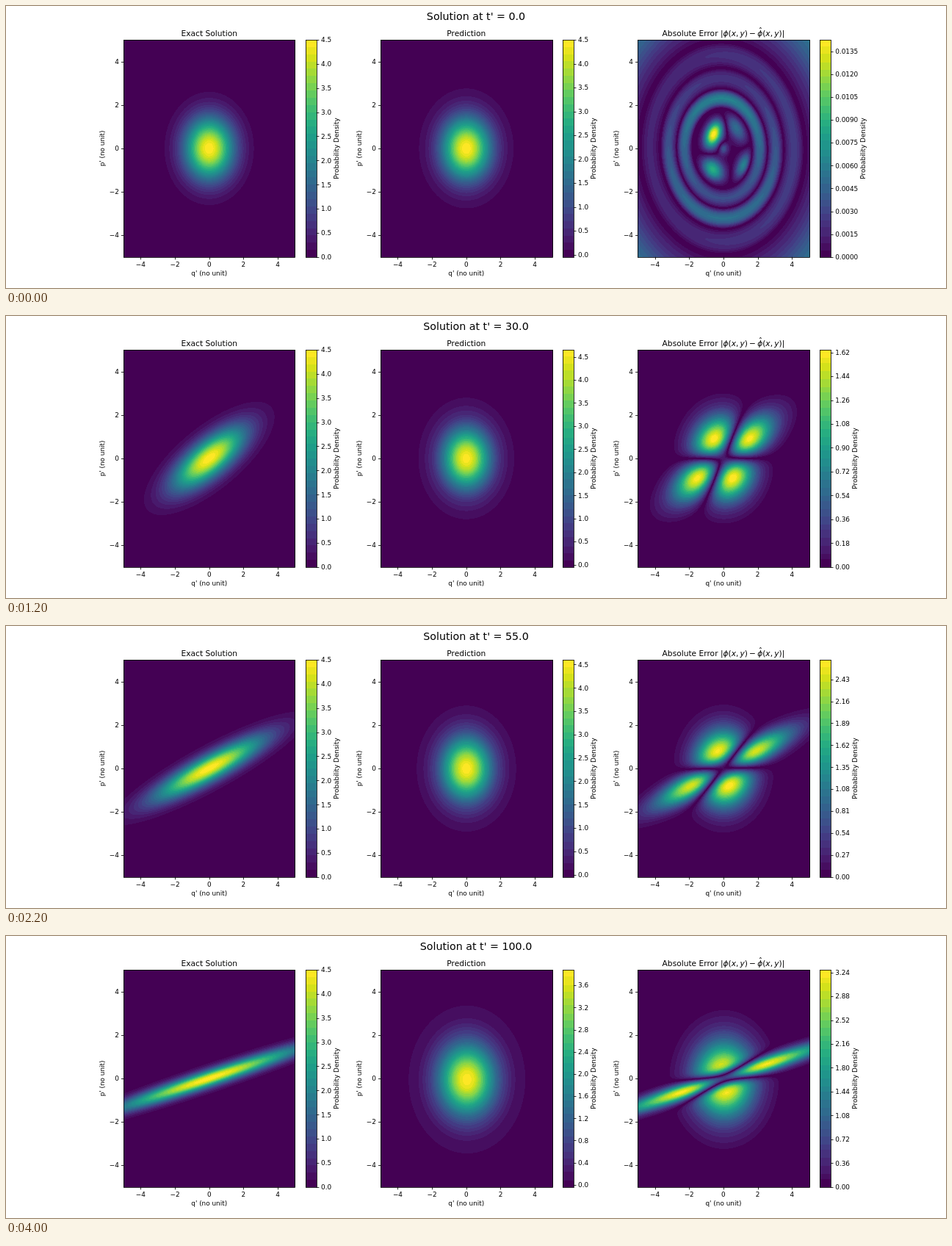
An HTML page with a canvas that plays this animation: 1280 px wide and 384 px high, repeating every 4200 ms.

```html
<!DOCTYPE html>
<html>
<head>
<meta charset="utf-8">
<style>
html, body { margin: 0; width: 100%; height: 100%; overflow: hidden; background: #fff; }
canvas { display: block; }
</style>
</head>
<body>
<canvas id="stage" width="1280" height="384"></canvas>
<script>
const ctx = document.getElementById('stage').getContext('2d');
const FRAME_MS = 200, FRAMES = 21, DT = 5;
const W = 233.4, TOP = 46.08, BOTTOM = 341.76, H = BOTTOM - TOP;
const PANELS = [160, 510.1, 860.2], BAR_GAP = 248, BAR_W = 14.78;
const SMALL = 8.89, TITLE = 10.67, HEAD = 14.22, TICK = 3.1, PAD = 6.2;
const SHADES = 30;

const viridis = ('440154 48186a 472d7b 424086 3b528b 33638d 2c728e 26828e 21918c ' +
  '1fa088 28ae80 3fbc73 5ec962 84d44b addc30 d8e219 fde725').split(' ')
  .map(h => [0, 2, 4].map(i => parseInt(h.substr(i, 2), 16)));
const shades = Array.from({ length: SHADES }, (_, k) => {
  const u = k / (SHADES - 1) * 16, i = Math.min(15, Math.floor(u));
  return viridis[i].map((c, j) => Math.round(c + (viridis[i + 1][j] - c) * (u - i)));
});

// time, prediction peak, prediction falloff, error peak
const KEYS = [
  [0, 4.49, .5, .0142], [5, 4.51, .508, .305], [10, 4.53, .516, .61], [15, 4.55, .524, .91],
  [20, 4.57, .532, 1.18], [35, 4.63, .515, 1.87], [50, 4.6, .495, 2.49], [55, 4.58, .488, 2.66],
  [70, 4.43, .457, 3.02], [85, 4.18, .424, 3.15], [100, 3.86, .381, 3.27]
];

function keyed(t) {
  const i = Math.max(1, KEYS.findIndex(k => k[0] >= t));
  const a = KEYS[i - 1], b = KEYS[i], f = (t - a[0]) / (b[0] - a[0]);
  return a.map((v, j) => v + (b[j] - v) * f);
}

// Contour levels with a round step, at most 101 intervals
function scale(max, negative) {
  const raw = max / 101, mag = 10 ** Math.floor(Math.log10(raw));
  const step = mag * [1, 1.5, 2, 2.5, 3, 4, 5, 6, 8, 10].find(m => m * mag >= raw - 1e-9);
  const up = Math.ceil(max / step - 1e-9), low = negative ? -1 : 0, count = up - low;
  const every = Math.ceil((count + 1) / 10);
  const shade = v => {
    const i = Math.max(0, Math.min(count - 1, Math.floor(v / step - low)));
    return Math.floor((i + .5) / count * SHADES);
  };
  return { min: low * step, max: up * step, up, every, step, shade };
}

// Gaussian spot, its long axis turned by the given angle
function spot(q, p, x, y, long, short, angle) {
  const c = Math.cos(angle), s = Math.sin(angle), dx = q - x, dy = p - y;
  return Math.exp(-(((dx * c + dy * s) / long) ** 2 + ((dy * c - dx * s) / short) ** 2) / 2);
}

// Small ripples left over at the start: four spots inside, rings outside
function residual(q, p) {
  const a = Math.atan2(p, q), up = Math.sin(a);
  const r = Math.hypot(q, p) + .08 * Math.cos(a) + .06 * Math.sin(2 * a + 1);
  if (r < 1.8) {
    return (1 - (r / 1.8) ** 6) * (
      .0145 * spot(q, p, -.57, .66, .48, .32, 1) - .0095 * spot(q, p, -.65, -1, .5, .36, -.5)
      + .0095 * spot(q, p, 1.3, -.8, .55, .3, 1) - .006 * spot(q, p, .8, 1, .6, .35, -.8)
      - .004 * spot(q, p, 0, 0, .2, .2, 0));
  }
  if (r < 2.7) return .0048 * (1 + .3 * up) * Math.sin(Math.PI * (r - 1.8) / .9);
  if (r < 3.65) return .0038 * (1 - .4 * up) * Math.sin(Math.PI * (r - 2.7) / .95);
  if (r < 4.85) return (.0021 + .0006 * Math.cos(a)) * Math.sin(Math.PI * (r - 3.65) / 1.2);
  return .0024 * (r - 4.85);
}

function model(t) {
  const [, peak, fall, errPeak] = keyed(t);
  const s = .0355 * t, tail = .004 * Math.min(1, t / 20), drift = (t / 100) ** 3;
  const exact = (q, p) => 4.49 * Math.exp(-((q - s * p) ** 2 + p * p) / 2);
  const guess = (q, p) => {
    const r2 = (q - .04 * drift) ** 2 + (p + .05 * drift) ** 2;
    return peak * Math.exp(-fall * r2 + tail * r2 * r2);
  };
  const error = (q, p) => Math.abs(t ? exact(q, p) - guess(q, p) : residual(q, p));
  return [
    { f: exact, sc: scale(4.49) },
    { f: guess, sc: scale(peak, true) },
    { f: error, sc: scale(errPeak) }
  ];
}

function text(s, x, y, size, align = 'center', italic = '') {
  ctx.font = `${italic} ${size}px "DejaVu Sans", sans-serif`;
  ctx.textAlign = align;
  ctx.fillText(s, x, Math.round(y));
  return ctx.measureText(s).width;
}

function upright(s, x, y) {
  ctx.save();
  ctx.translate(Math.round(x), y);
  ctx.rotate(-Math.PI / 2);
  text(s, 0, 0, SMALL);
  ctx.restore();
}

// Thin strokes sit on pixel centres
const snap = v => Math.round(v) + .5;

function line(x1, y1, x2, y2) {
  ctx.beginPath();
  ctx.moveTo(x1, y1);
  ctx.lineTo(x2, y2);
  ctx.stroke();
}

function frame(x, w) {
  const l = snap(x), t = snap(TOP);
  ctx.strokeRect(l, t, snap(x + w) - l, snap(BOTTOM) - t);
}

function errorTitle(cx, y) {
  const runs = ['Absolute Error |', '*ϕ', '(', '*x', ',\u2009', '*y', ')\u2009−\u2009',
    '^ϕ', '(', '*x', ',\u2009', '*y', ')|'];
  const parts = runs.map(r => /^[*^]/.test(r) ? [r.slice(1), 'italic', r[0] === '^'] : [r, '', false]);
  let total = 0;
  for (const [s, style] of parts) {
    ctx.font = `${style} ${TITLE}px "DejaVu Sans", sans-serif`;
    total += ctx.measureText(s).width;
  }
  let x = cx - total / 2;
  for (const [s, style, hat] of parts) {
    const w = text(s, x, y, TITLE, 'left', style);
    if (hat) text('ˆ', x + w / 2 + .8, y - 3, TITLE);
    x += w;
  }
}

function field(x0, { f, sc }) {
  const left = Math.round(x0), top = Math.round(TOP);
  const w = Math.round(x0 + W) - left + 1, h = Math.round(H);
  const img = ctx.createImageData(w, h);
  for (let y = 0, o = 0; y < h; y++) {
    const p = 5 - (y + top + .5 - TOP) / H * 10;
    for (let x = 0; x < w; x++, o += 4) {
      const q = (x + left + .5 - x0) / W * 10 - 5;
      img.data.set([...shades[sc.shade(f(q, p))], 255], o);
    }
  }
  ctx.putImageData(img, left, top);
}

function axes(x0) {
  frame(x0, W);
  for (let v = -4; v <= 4; v += 2) {
    const x = x0 + (v + 5) / 10 * W, y = BOTTOM - (v + 5) / 10 * H;
    const label = String(v).replace('-', '−');
    line(snap(x), BOTTOM, snap(x), BOTTOM + TICK + .5);
    line(x0, snap(y), x0 - TICK, snap(y));
    text(label, x, 355, SMALL);
    text(label, x0 - PAD, y + 3.3, SMALL, 'right');
  }
  text("q' (no unit)", x0 + W / 2, 367, SMALL);
  upright("p' (no unit)", x0 - 26, TOP + H / 2);
}

function colorbar(x, sc) {
  const span = sc.max - sc.min, top = Math.round(TOP), end = Math.round(BOTTOM);
  for (let y = top; y < end; y++) {
    const v = sc.min + (end - y - .5) / (end - top) * span;
    ctx.fillStyle = `rgb(${shades[sc.shade(v)]})`;
    ctx.fillRect(Math.round(x), y, 15, 1);
  }
  ctx.fillStyle = '#000';
  frame(x, BAR_W);
  const gap = sc.every * sc.step, right = x + BAR_W;
  let digits = 1;
  while (Math.abs(gap * 10 ** digits - Math.round(gap * 10 ** digits)) > 1e-6) digits++;
  let wide = 0;
  for (let i = 0; i <= sc.up; i += sc.every) {
    const v = i * sc.step, y = BOTTOM - (v - sc.min) / span * H;
    line(right, snap(y), right + TICK + .5, snap(y));
    wide = text(v.toFixed(digits), right + PAD, y + 3.3, SMALL, 'left');
  }
  upright('Probability Density', right + PAD + wide + 10.2, TOP + H / 2);
}

function draw(t) {
  ctx.fillStyle = '#fff';
  ctx.fillRect(0, 0, 1280, 384);
  ctx.fillStyle = ctx.strokeStyle = '#000';
  ctx.lineWidth = .8;
  text(`Solution at t' = ${t.toFixed(1)}`, 640, 19, HEAD);
  model(t).forEach((panel, i) => {
    const x = PANELS[i], mid = x + W / 2;
    field(x, panel);
    axes(x);
    colorbar(x + BAR_GAP, panel.sc);
    if (i < 2) text(['Exact Solution', 'Prediction'][i], mid, 41, TITLE);
    else errorTitle(mid, 41);
  });
}

let shown = -1;
function tick() {
  const n = Math.floor(performance.now() / FRAME_MS) % FRAMES;
  if (n !== shown) draw(DT * (shown = n));
  requestAnimationFrame(tick);
}
tick();
</script>
</body>
</html>
```
